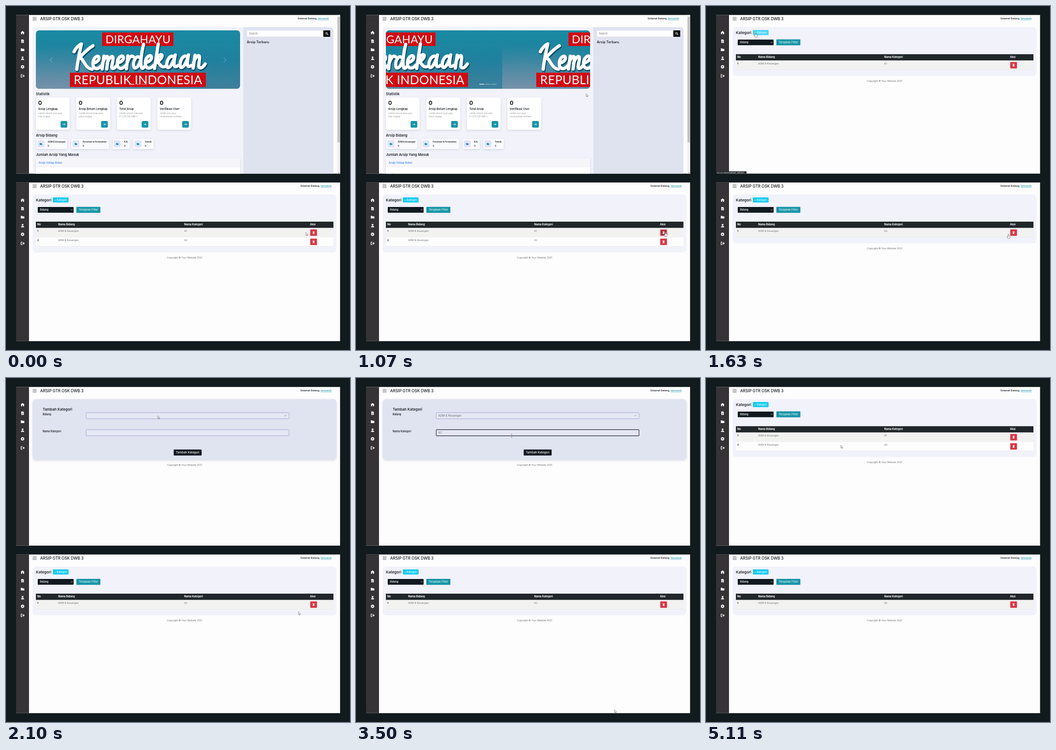
Recreate the animation shown at these times as an HTML page. Size 748 px wide and 748 px high, loop 5.15 s.

```html
<!DOCTYPE html>
<html lang="id">
<head>
<meta charset="utf-8">
<style>
html, body { margin: 0; width: 100%; height: 100%; overflow: hidden; background: #111a1c; }
svg { display: block; width: 100vw; height: 100vh; }
text { font-family: Inter, "Open Sans", sans-serif; white-space: pre; }
.poster { font-family: Lato, "Open Sans", sans-serif; letter-spacing: .3px; }
</style>
</head>
<body>
<svg id="stage" viewBox="0 0 748 748"></svg>
<script>
const LOOP = 5150, LOWER = 364.1;
const TEAL = '#1795a8', INK = '#20262a', DARK = '#101920', MUTED = '#6c6f73', RED = '#dc3545';
const ORG = 'GTR OSK DWB 3', USER = 'tamuweb';

const rect = (x, y, w, h, fill, r = 0, extra = '') =>
  `<rect x="${x}" y="${y}" width="${w}" height="${h}" rx="${r}" fill="${fill}" ${extra}/>`;
const text = (s, x, y, size, fill = INK, weight = 400, extra = '') =>
  `<text x="${x}" y="${y}" font-size="${size}" fill="${fill}" font-weight="${weight}" ${extra}>${s.replace(/&/g, '&amp;')}</text>`;
const line = (d, color, w = 1, extra = '') =>
  `<path d="${d}" fill="none" stroke="${color}" stroke-width="${w}" stroke-linecap="round" stroke-linejoin="round" ${extra}/>`;
const shape = (d, fill, extra = '') => `<path d="${d}" fill="${fill}" ${extra}/>`;
const group = (id, body, extra = '') => `<g id="${id}" ${extra}>${body}</g>`;
const at = (x, y, body) => `<g transform="translate(${x} ${y})">${body}</g>`;

// Icons are centred on their own origin
const folder = c => shape('M-3.8-2.8H-.8L.4-1.7H3.8V2.9H-3.8Z', c);
const chevron = c => line('M-1.6-.8L0 .8L1.6-.8', c, .7);
const trash = shape('M-2.2-2.3H-.9L-.6-2.9H.6L.9-2.3H2.2V-1.6H-2.2ZM-1.8-1.2H1.8L1.6 3H-1.6Z', '#fff');
const arrow = line('M-2.2 0H2.2M.5-1.7L2.2 0L.5 1.7', '#fff', .9);
const teeth = [0, 45, 90, 135].map(a => rect(-.9, -3.9, 1.8, 7.8, '#fff', .3, `transform="rotate(${a})"`)).join('');
const sideIcons = [
  [58, shape('M0-3.8L4.3 0H3.2V3.6H.9V1H-.9V3.6H-3.2V0H-4.3Z', '#fff')],
  [76.5, shape('M-2.8-3.7H1L2.8-1.9V3.7H-2.8Z', '#fff') + line('M-1.4 0H1.4M-1.4 1.8H1.4', '#353335', .6)],
  [95, folder('#fff')],
  [113.5, '<circle cy="-1.8" r="2" fill="#fff"/>' + shape('M-3.5 3.7C-3.5-.3 3.5-.3 3.5 3.7Z', '#fff')],
  [132.3, teeth + '<circle r="2.7" fill="#fff"/><circle r="1.2" fill="#353335"/>'],
  [152, line('M-.8-2.8H-3.3V2.8H-.8M-1 0H3.6M1.8-1.9L3.7 0L1.8 1.9', '#fff', 1.2)]
];

const chrome = rect(22, 19, 705, 347, '#fdfdfd') + rect(21, 19, 29, 347, '#353335') +
  sideIcons.map(([y, icon]) => at(36, y, icon)).join('') +
  line('M58.3 24.8H66M58.3 27.7H66M58.3 30.6H66', '#333', .8) +
  text('ARSIP ' + ORG, 74.3, 31, 8.5, '#17191b', 500);
const welcome = right => text(`Selamat Datang, <tspan fill="${TEAL}" font-weight="500" text-decoration="underline">${USER}</tspan>`,
  right, 29.4, 5.4, INK, 600, 'text-anchor="end"');
const copyright = y => text('Copyright © Your Website 2021', 388.3, y, 5.15, '#6a6a6a', 400, 'text-anchor="middle"');

// Brush lettering, each letter drawn from its left baseline
const letters = {
  K: 'M3-38C7-47 14-53 19-55C15-37 11-18 9 0M44-51C34-45 22-33 14-24C23-28 26-1 42 0',
  e: 'M2-13C10-14 17-20 15-26C12-32 2-24 2-12C2 1 12 2 20-7',
  m: 'M5-28L1 0M2-12C6-25 14-33 14-22L11 0M12-12C16-25 25-33 25-22L22-5C22 1 27 0 31-6',
  r: 'M5-28L2 0M4-14C8-25 12-30 17-26',
  d: 'M17-23C8-33 0-14 3-4C6 4 15-6 18-20M24-53C20-36 16-10 20-2C22 1 25-2 27-6',
  k: 'M10-53L2 0M4-12C14-16 23-29 16-30C10-30 6-18 5-14C13-16 13 0 25-4',
  a: 'M19-24C10-33 0-14 3-4C6 3 14-6 19-22M21-29C17-10 17 2 27-6',
  n: 'M5-28L1 0M2-12C6-25 15-33 15-22L13-4C14 2 21 1 27-9'
};
const starts = [145, 187, 208, 240, 260, 275, 301, 321, 347, 376, 406];
const brush = (color, w) => [...'Kemerdekaan'].map((c, i) =>
  line(letters[c], color, w, `transform="translate(${starts[i]} ${137.5 - i * .25})"`)).join('');
const poster = (s, y, size) => text(s, 287, y, size, '#fff', 400, 'class="poster" text-anchor="middle"');
const slide = rect(65, 53, 444, 127, 'url(#sky)') + rect(65, 53, 444, 127, 'url(#haze)') +
  rect(209, 57.5, 155, 29.5, '#d20a11') + rect(139, 145, 295.5, 31, '#d20a11') +
  poster('DIRGAHAYU', 81, 24) + poster('REPUBLIK INDONESIA', 170, 26.5) +
  `<g aria-label="Kemerdekaan">${at(1.5, 2.5, brush('#0b4d66', 7.6))}${brush('#fff', 7)}</g>`;

const statCards = [
  ['Arsip Lengkap', 'Jumlah seluruh arsip yang', 'telah lengkap'],
  ['Arsip Belum Lengkap', 'Jumlah seluruh arsip yang', 'belum lengkap'],
  ['Total Arsip', 'Jumlah seluruh total arsip', 'PT ' + ORG],
  ['Verifikasi User', 'Jumlah user yang', 'membutuhkan verifikasi']
].map(([title, a, b], i) => at(65 + i * 88.1, 199,
  rect(0, 0, 73.3, 70, '#fff', 4, 'filter="url(#soft)"') + text('0', 5, 16.2, 12, '#111', 700) +
  text(title, 5, 27.3, 6.1, INK, 600) + text(a, 5, 36.3, 4.2, '#909295') + text(b, 5, 42.8, 4.2, '#909295') +
  rect(53.7, 51, 14.6, 14.6, TEAL, 3.2) + at(61, 58.3, arrow))).join('');
const fieldCards = [[66, 67, 'ADM & Keuangan'], [142, 82, 'Perizinan & Pertanahan'], [232, 37, 'K3L'], [277, 44, 'Teknik']]
  .map(([x, w, name]) => at(x, 289, rect(0, 0, w, 22, '#fafaff', 2.5, 'filter="url(#soft)"') +
    rect(2.7, 3.2, 14.5, 15, '#dfe3fa', 2.5) + at(10, 11, `<g transform="scale(.7)">${folder(TEAL)}</g>`) +
    text(name, 24.8, 7.5, 4.6, INK, 600) + text('0', 24.8, 16.6, 4.8, INK, 600))).join('');

const home = welcome(702) +
  shape('M58 366V53Q58 46 65 46H516V366Z', '#f2f2fa') + shape('M516 366V46H705Q712 46 712 53V366Z', '#dfe2ef') +
  `<g clip-path="url(#banner)"><g id="track">${group('slide', slide)}<use href="#slide" x="444"/></g></g>` +
  line('M100 112.5L96 117L100 121.5M474 112.5L478 117L474 121.5', '#fff', .8, 'opacity=".6"') +
  [0, 1, 2].map(i => rect(268 + i * 13.2, 169.5, 11.2, 1.2, '#fff', 0, `opacity="${i ? .5 : 1}"`)).join('') +
  text('Statistik', 65, 194.2, 7.6, INK, 600) + statCards +
  text('Arsip Bidang', 65, 283.7, 7.6, INK, 600) + fieldCards +
  text('Jumlah Arsip Yang Masuk', 65, 326.3, 7.5, INK, 600) +
  rect(65, 331.5, 444, 40, '#fff', 2.5, 'filter="url(#soft)"') + rect(65, 331.5, 444, 18.5, '#f6f6fa', 2.5) +
  line('M65 350H509', '#e2e3e8', .5) + text('Arsip Setiap Bulan', 71, 343, 5.9, '#3f86f5', 500) +
  line('M78 364.5H81', '#999', .7) +
  rect(523.8, 53, 166.4, 14, '#fff', 1, 'stroke="#d0d3dc" stroke-width=".5"') + text('Search', 528, 62, 5.9, '#777') +
  rect(690, 53, 15, 14, '#0a0d10', 1) + '<circle cx="696.8" cy="59.3" r="1.9" fill="none" stroke="#fff"/>' +
  line('M698.3 60.8L700.2 62.7', '#fff', 1.1) + text('Arsip Terbaru', 523.8, 81, 7.3, INK, 600) +
  rect(720.2, 19, 6.8, 347, '#f0f0f0') + rect(720.8, 23.5, 5, 273, '#c2c2c2') +
  shape('M722 362.5H725L723.5 364.2Z', '#555');

function category(id, rows) {
  const extra = (rows.length - 1) * 20;
  const body = rows.map((name, i) => {
    const y = 118.5 + i * 20;
    return rect(65, y, 647, 20, i ? '#fdfdfd' : '#f2f2f1') + line(`M65 ${y + 20}H712`, '#dedfe0', .5) +
      text(String(i + 1), 68, y + 8.9, 5.3, INK, 700) + text('ADM & Keuangan', 113.5, y + 8.9, 5.4, MUTED) +
      text(name, 387.5, y + 8.9, 5.4, MUTED) +
      rect(661.5, y + 3.2, 14.7, 14, RED, 1.3, `id="${id}Del${i}" stroke-width="1.8"`) + at(668.8, y + 10, trash);
  }).join('');
  return group(id, welcome(708) + rect(58, 46, 660.5, 106 + extra * .98, '#f1f2fa', 7) +
    text('Kategori', 65, 60.6, 8.2, INK, 600) + rect(102, 52.2, 34, 11, '#0dcaf0', 1.3, `id="${id}Add"`) +
    text('+ Kategori', 119, 59.5, 5.6, '#fff', 500, 'text-anchor="middle"') +
    rect(69, 73, 78, 12.3, DARK, 1) + text('Bidang', 74, 81.2, 5.5, '#fff', 500) + at(142.8, 79.2, chevron('#fff')) +
    rect(153, 72.6, 52.2, 13, TEAL, 1) + text('Terapkan Filter', 179.1, 81.4, 6, '#fff', 400, 'text-anchor="middle"') +
    rect(65, 104.8, 647, 13.8, INK) +
    [['No', 68], ['Nama Bidang', 113.5], ['Nama Kategori', 387.5], ['Aksi', 661]]
      .map(([s, x]) => text(s, x, 113.3, 5.6, '#fff', 700)).join('') +
    body + copyright(165 + extra));
}

const field = (id, y) => rect(174.4, y, 441, 13.2, '#e5e8f4', 1, `id="${id}" stroke="#959bc6" stroke-width=".8"`);
const form = welcome(708) + rect(58, 46, 660.5, 132, '#e0e3f0', 7, 'filter="url(#soft)"') +
  text('Tambah Kategori', 79.8, 70.6, 7.8, INK, 600) + text('Bidang', 79.8, 80.7, 5.5, INK, 600) +
  field('unit', 75.4) + text('', 179, 84.1, 6.1, MUTED, 400, 'id="unitText"') + at(607.5, 82, chevron('#555')) +
  text('Nama Kategori', 79.8, 117.7, 5.6, INK, 600) +
  field('name', 112.4) + text('', 179, 121.1, 6.1, MUTED, 400, 'id="nameText"') +
  line('M187.2 116V122', '#222', .6, 'id="caret"') +
  rect(364.6, 155.4, 60.8, 13.2, DARK, 1.3, 'id="save" stroke="#8f959c" stroke-width="0"') +
  text('Tambah Kategori', 395, 164.2, 6.3, '#fff', 500, 'text-anchor="middle"') + copyright(190.7);

const link = rect(22, 359.5, 66, 6, '#222629') +
  text('127.0.0.1:8000/tambah_kategori', 23.5, 363.9, 4, '#fff');

// Pointer tips sit on the origin
const pointers = id => group(id,
  shape('M0 0V6.4L1.5 5L2.6 7.4L3.6 7L2.5 4.6H4.6Z', '#fff', 'stroke="#555" stroke-width=".6" data-kind="arrow"') +
  shape('M-.8 0Q0-.9.8 0V3L3.7 3.8V6.3L2.7 8.7H-1.2L-3.3 5.3L-2.2 4.6L-.8 5.6Z', '#fff', 'stroke="#444" stroke-width=".6" data-kind="hand"') +
  line('M-1.2-3.5H1.2M0-3.5V3.5M-1.2 3.5H1.2', '#777', .6, 'data-kind="beam"'));

const stage = document.getElementById('stage');
stage.innerHTML = `<defs>
  <linearGradient id="sky" x1="0" y1="0" x2="0" y2="1"><stop stop-color="#1a8aa2"/><stop offset=".5" stop-color="#1f819e"/><stop offset="1" stop-color="#3f7f9c"/></linearGradient>
  <radialGradient id="haze" cx=".08" cy="1" r=".75"><stop stop-color="#8799ae" stop-opacity=".75"/><stop offset="1" stop-color="#8799ae" stop-opacity="0"/></radialGradient>
  <clipPath id="banner">${rect(65, 53, 444, 127, '#000', 7)}</clipPath>
  <clipPath id="panel">${rect(21.8, 19.6, 704.6, 345, '#000')}</clipPath>
  <filter id="soft" x="-20%" y="-20%" width="140%" height="150%"><feDropShadow dx="0" dy="1.5" stdDeviation="2" flood-color="#50587a" flood-opacity=".2"/></filter>
</defs>` + rect(0, 0, 748, 748, '#111a1c') +
  `<g clip-path="url(#panel)">${chrome}${group('home', home)}${category('one', ['A1'])}${group('form', form)}${category('both', ['A1', 'A2'])}${group('link', link)}${pointers('upper')}</g>` +
  `<g transform="translate(0 ${LOWER})"><g clip-path="url(#panel)">${chrome}${category('full', ['A1', 'A2'])}${category('left', ['A2'])}${pointers('lower')}</g></g>`;

const el = id => document.getElementById(id);
const show = (node, on) => node.setAttribute('display', on ? 'inline' : 'none');
const set = (id, key, value) => el(id).setAttribute(key, value);
const ease = p => { p = Math.min(1, Math.max(0, p)); return p * p * (3 - 2 * p); };
const within = (t, a, b) => t >= a && t < b;

function along(keys, t) {
  const i = keys.findIndex(k => k[0] > t);
  if (i < 1) return keys[i < 0 ? keys.length - 1 : 0].slice(1);
  const [a, b] = [keys[i - 1], keys[i]], p = ease((t - a[0]) / (b[0] - a[0]));
  return [a[1] + (b[1] - a[1]) * p, a[2] + (b[2] - a[2]) * p];
}
function point(id, [x, y], kind) {
  set(id, 'transform', `translate(${x} ${y})`);
  for (const node of el(id).children) show(node, node.dataset.kind === kind);
}

const upperPath = [[960, 560, 235], [1070, 500.5, 190.5], [1220, 37, 95], [1330, 37, 95], [1540, 108, 59],
  [1800, 108, 59], [2040, 330, 82], [2200, 330, 82], [2380, 338.5, 125.5], [3500, 338.5, 125.5],
  [4150, 423, 160], [4500, 423, 160], [5000, 293, 146]];
const lowerPath = [[0, 652, 128.5], [450, 673, 128], [1300, 673, 128], [1600, 657.5, 132.5],
  [1800, 657.5, 132.5], [2600, 590, 169.5], [3000, 590, 169.5], [3600, 560, 372]];

function draw(t) {
  show(el('home'), t < 1270);
  show(el('one'), within(t, 1270, 1800));
  show(el('form'), within(t, 1800, 4520));
  show(el('both'), t >= 4520);
  show(el('full'), t < 1350);
  show(el('left'), t >= 1350);
  set('track', 'transform', `translate(${-444 * ease((t - 1003) / 150)} 0)`);

  const overAdd = within(t, 1500, 1800);
  show(el('link'), overAdd);
  set('oneAdd', 'fill', overAdd ? '#40d6f3' : '#0dcaf0');

  el('unitText').textContent = t < 2150 ? '' : 'ADM & Keuangan';
  el('nameText').textContent = 'A2'.slice(0, t < 2480 ? 0 : t < 2580 ? 1 : 2);
  const typing = within(t, 2400, 4200);
  set('name', 'stroke', typing ? '#22262c' : '#959bc6');
  set('name', 'stroke-width', typing ? 1.1 : .8);
  show(el('caret'), within(t, 2580, 4200) && (t - 2580) % 1000 < 500);
  set('save', 'stroke-width', t >= 4200 ? 1.6 : 0);

  const overDelete = within(t, 400, 1350);
  set('fullDel0', 'fill', overDelete ? '#b02a37' : RED);
  set('fullDel0', 'stroke', within(t, 1000, 1350) ? '#e9a2a9' : 'none');

  const hand = within(t, 1180, 1270) || overAdd || within(t, 4080, 4520);
  const beam = within(t, 2300, 3700);
  point('upper', along(upperPath, t), t < 960 ? '' : hand ? 'hand' : beam ? 'beam' : 'arrow');
  point('lower', along(lowerPath, t), t > 3600 ? '' : within(t, 400, 1850) ? 'hand' : 'arrow');
}

const begin = performance.now();
function tick() {
  draw((performance.now() - begin) % LOOP);
  requestAnimationFrame(tick);
}
tick();
</script>
</body>
</html>
```
